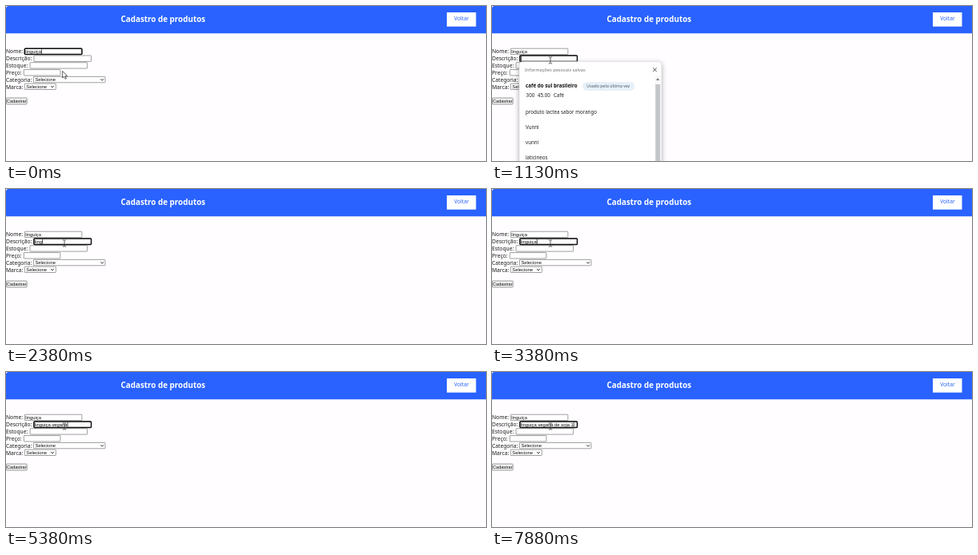
An HTML page that plays this animation: 600 px wide and 194 px high, repeating every 8 s.

```html
<!DOCTYPE html>
<html lang="pt-BR">
<head>
<meta charset="utf-8">
<title>Cadastro de produtos</title>
<style>
  html, body { margin: 0; width: 100%; height: 100%; overflow: hidden; background: #fffdff; }
  svg { display: block; width: 100vw; height: 100vh; }
  text { font: 6.7px "Noto Sans", "Open Sans", sans-serif; fill: #1c1c1c; white-space: pre; }
  .title { font-size: 9.85px; font-weight: 700; fill: #fff; }
  .back { font-size: 6.6px; fill: #2962ff; }
  .control text { font: 5.83px "Liberation Sans", Arial, sans-serif; fill: #111; }
  .box { fill: #fff; stroke: #777; stroke-width: .7; }
  .ring { fill: none; stroke: #101010; stroke-width: 1.5; }
  .caret { stroke: #000; stroke-width: .7; }
  .chevron { fill: none; stroke: #222; stroke-width: 1; }
  .panel { fill: #fff; stroke: #cfcfd2; stroke-width: .5; filter: drop-shadow(0 2px 3px rgba(0, 0, 0, .32)); }
  .popup text { font-size: 6.2px; fill: #202124; }
  .popup .head { font-size: 5.68px; fill: #6d7074; }
  .popup .strong { font-weight: 700; font-size: 6.28px; fill: #111; }
  .popup .tag { font-size: 5.25px; fill: #4c5a68; }
  .close { fill: none; stroke: #333; stroke-width: .9; }
</style>
</head>
<body>
<svg viewBox="0 0 600 194" preserveAspectRatio="none">
  <rect width="600" height="194" fill="#fffdff"/>
  <path d="M2 0H600V34.3H0V2Z" fill="#2962ff"/>
  <text class="title" x="143.5" y="20.2">Cadastro de produtos</text>
  <rect x="551" y="8" width="36.5" height="17.7" fill="#fff"/>
  <text class="back" x="560.3" y="18.4">Voltar</text>

  <g id="form"></g>
  <g class="control">
    <rect x=".4" y="115" width="25.8" height="8" rx="1" fill="#efefef" stroke="#777" stroke-width=".7"/>
    <text x="1" y="121.2" style="font-size:5.6px">Cadastrar</text>
    <text x="24.2" y="59.2" id="name">linguiça</text>
    <text x="36" y="68" id="desc"></text>
  </g>
  <rect class="ring" id="ring" width="71.6" height="7.4" rx="1"/>
  <path class="caret" id="caret"/>

  <g class="popup" id="saved">
    <rect class="panel" x="34" y="69.6" width="178" height="140" rx="4"/>
    <text class="head" x="41" y="81.8">Informações pessoais salvas</text>
    <path class="close" d="M201.2 77.5l4.6 4.6m0-4.6l-4.6 4.6"/>
    <rect x="203.5" y="87" width="8" height="107" fill="#f8f8f9"/>
    <path d="M205 93l2.2-2.8L209.400 93Z" fill="#777"/>
    <rect x="204.4" y="98" width="5.8" height="100" fill="#c4c5c8"/>
    <text class="strong" x="42" y="102.300">café do sul brasileiro</text>
    <rect x="113.300" y="95" width="65" height="11" rx="5.500" fill="#e7f0f8"/>
    <text class="tag" x="118.300" y="102.400">Usado pela última vez</text>
    <text x="42.600" y="114">300</text>
    <text x="57" y="114">45.00</text>
    <text x="77" y="114">Café</text>
    <text x="42" y="134.800">produto lactea sabor morango</text>
    <text x="42" y="153.800">Vunni</text>
    <text x="42" y="172.800">vunni</text>
    <text x="42" y="191.500">laticineos</text>
  </g>

  <g class="popup" id="stored">
    <rect class="panel" x="34" y="69.6" width="178" height="40.800" rx="4"/>
    <text class="head" x="43" y="81.800">Dados armazenados</text>
    <path class="close" d="M201.200 77.500l4.600 4.600m0-4.600l-4.600 4.600"/>
    <text x="42" y="101.600">laticineos</text>
  </g>

  <path id="arrow" d="M0 0V8.600L2 6.900L3.400 10L4.800 9.400L3.400 6.300H6Z" fill="#fff" stroke="#222" stroke-width=".7"/>
  <path id="beam" d="M-2.200-4H-.5L0-3.500L.5-4H2.200M0-3.500V3.500M-2.200 4H-.5L0 3.500L.5 4H2.200" fill="none" stroke="#3c3c40" stroke-width=".8"/>
</svg>
<script>
const LOOP = 8000;
const $ = id => document.getElementById(id);

// label, baseline, control x, y, width, select arrow x
const rows = [
  ["Nome:", 59.4, 23.3, 53.2, 71.6],
  ["Descrição:", 68.1, 34.9, 62, 71.6],
  ["Estoque:", 77, 30, 70.7, 71.6],
  ["Preço:", 86, 22.3, 79.6, 45.6],
  ["Categoria:", 94.7, 34.4, 88.4, 89.6, 120.3],
  ["Marca:", 103.6, 23.3, 97.1, 39, 58]
];

$("form").innerHTML = rows.map(([label, base, x, y, w, arrow]) => {
  const select = arrow
    ? `<text x="${x + 2}" y="${y + 6}">Selecione</text>
       <path class="chevron" d="M${arrow - 1.8} ${y + 3}l1.8 1.8l1.8-1.8"/>`
    : "";
  return `<text x="0" y="${base}">${label}</text>
    <g class="control"><rect class="box" x="${x}" y="${y}" width="${w}" height="7.4" rx=".6"/>${select}</g>`;
}).join("");

const phrase = "linguiça vegana de soja 1";

// time, letters typed
const typing = [
  [0, 0], [1750, 1], [2130, 2], [2250, 3], [2380, 4], [2500, 5], [2630, 6], [2750, 7], [3000, 8],
  [4380, 9], [4500, 10], [4630, 11], [4750, 12], [4880, 13], [5000, 15],
  [5750, 16], [6000, 17], [6130, 18], [6250, 19], [6380, 20], [6500, 21], [6630, 22], [6750, 23],
  [7750, 24], [7880, 25]
];
const focus = [[0, "name"], [750, "desc"]];
const popup = [[0, ""], [880, "saved"], [1750, "stored"], [2130, ""]];
const caretOn = [[0, 1], [1500, 0], [1750, 1], [3500, 0], [3880, 1], [5500, 0], [5750, 1], [7380, 0], [7750, 1]];
const pointer = [
  [0, ["arrow", 70.6, 81.4]], [130, ["beam", 73, 78]], [250, ["beam", 73, 75]],
  [380, ["beam", 73, 73]], [630, ["beam", 73, 68]]
];

function at(steps, t) {
  let value;
  for (const [start, v] of steps) if (t >= start) value = v;
  return value;
}

const show = (id, on) => $(id).setAttribute("visibility", on ? "visible" : "hidden");

function draw(t) {
  $("desc").textContent = phrase.slice(0, at(typing, t));

  const field = at(focus, t);
  const [, , x, y] = rows[field === "name" ? 0 : 1];
  $("ring").setAttribute("x", x);
  $("ring").setAttribute("y", y);

  const text = $(field);
  const end = +text.getAttribute("x") + text.getComputedTextLength() + .5;
  $("caret").setAttribute("d", `M${end} ${y + 1}v5.6`);
  show("caret", at(caretOn, t));

  const open = at(popup, t);
  for (const id of ["saved", "stored"]) show(id, id === open);

  const [shape, px, py] = at(pointer, t);
  for (const id of ["arrow", "beam"]) show(id, id === shape);
  $(shape).setAttribute("transform", `translate(${px} ${py})`);
}

const start = performance.now();
function tick() {
  draw((performance.now() - start) % LOOP);
  requestAnimationFrame(tick);
}
tick();
</script>
</body>
</html>
```
